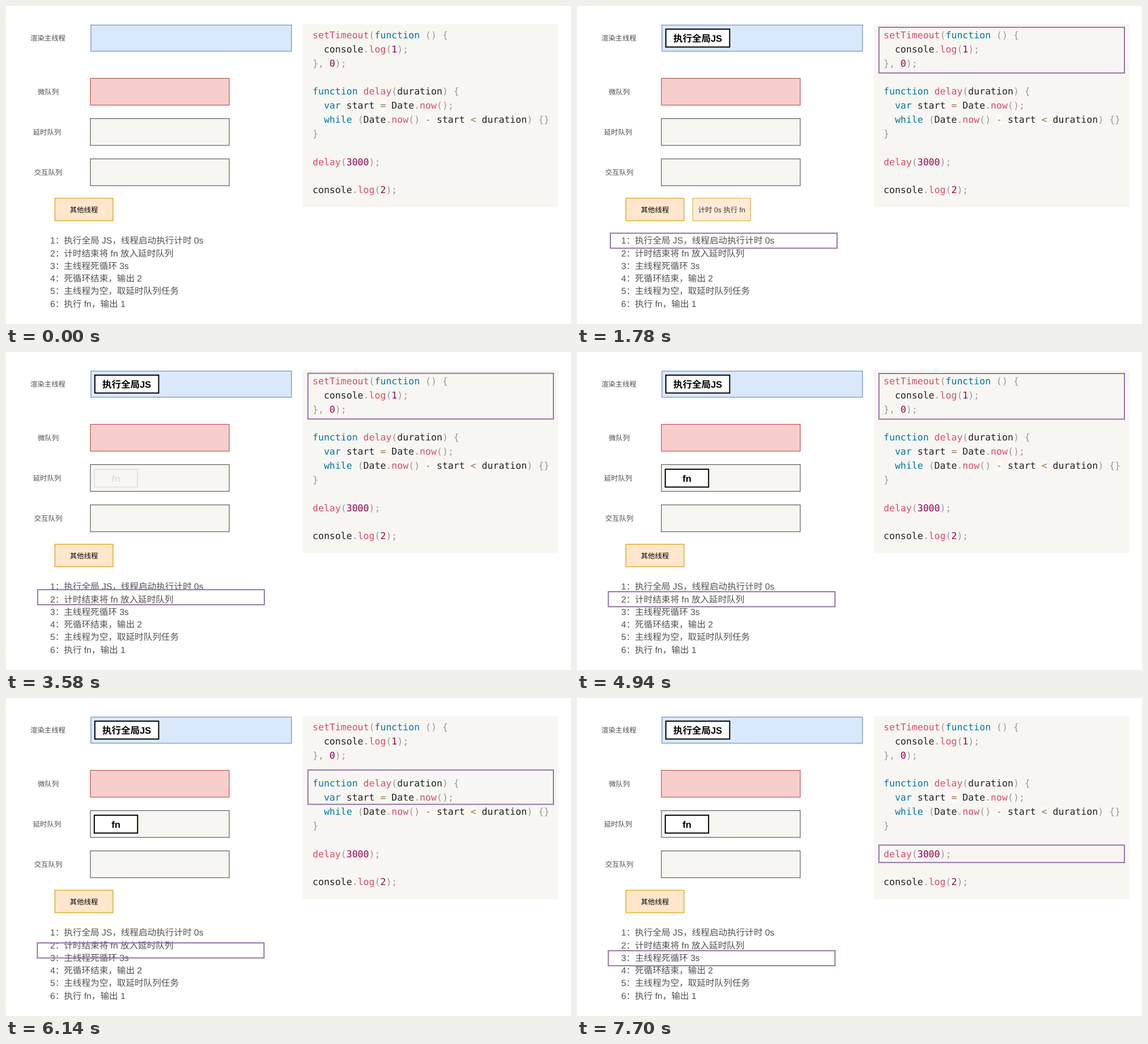
Recreate the animation shown at these times as an HTML page. Size 997 by 561 pixels, loop 8000 ms.

```html
<!DOCTYPE html>
<html lang="zh-CN">
<head>
<meta charset="utf-8">
<title>事件循环</title>
<style>
  html, body { margin: 0; width: 100%; height: 100%; overflow: hidden; background: #fff; }
  svg { display: block; width: 997px; height: 561px; }
  text { font-family: "Liberation Sans", "Noto Sans CJK SC", "Noto Sans CJK", sans-serif; font-size: 12.4px; white-space: pre; text-rendering: geometricPrecision; }
  .mid { text-anchor: middle; }
  .label { fill: #4c4c4c; }
  .list { font-size: 15.6px; fill: #505050; }
  .task { font-size: 16.5px; font-weight: bold; }
  .code { font-family: "DejaVu Sans Mono", monospace; font-size: 16.54px; fill: #222; }
  .frame { fill: none; stroke: #9673a6; stroke-width: 2; }
</style>
</head>
<body>
<svg id="stage" viewBox="0 0 997 561"></svg>
<script>
const LOOP = 8000;
const stage = document.getElementById('stage');

function add(parent, tag, attrs, content = '') {
  const node = document.createElementNS('http://www.w3.org/2000/svg', tag);
  for (const key in attrs) node.setAttribute(key, attrs[key]);
  node.textContent = content;
  return parent.appendChild(node);
}

const box = (parent, x, y, width, height, fill, stroke = 'none', strokeWidth = 1.2) =>
  add(parent, 'rect', { x, y, width, height, fill, stroke, 'stroke-width': strokeWidth });
const text = (parent, x, y, cls, content) => add(parent, 'text', { x, y, class: cls }, content);

// Queues and threads
const ORANGE = ['#ffe6cc', '#d79b00'];
const CREAM = '#f7f6f2';
box(stage, 149.8, 33.6, 354, 46.2, '#dae8fc', '#6c8ebf');
box(stage, 148.9, 127.6, 245, 47.3, '#f8cecc', '#b85450');
box(stage, 148.9, 198.6, 245, 47.3, CREAM, '#5c5c5c');
box(stage, 148.9, 269.7, 245, 47.3, CREAM, '#5c5c5c');
box(stage, 86.3, 339.2, 102.5, 39.6, ...ORANGE);
text(stage, 74, 61, 'mid label', '渲染主线程');
text(stage, 74.5, 156, 'mid label', '微队列');
text(stage, 72.5, 227, 'mid label', '延时队列');
text(stage, 74.5, 298, 'mid label', '交互队列');
text(stage, 137.5, 363.5, 'mid', '其他线程');

[
  '执行全局 JS，线程启动执行计时 0s',
  '计时结束将 fn 放入延时队列',
  '主线程死循环 3s',
  '死循环结束，输出 2',
  '主线程为空，取延时队列任务',
  '执行 fn，输出 1'
].forEach((line, i) => text(stage, 78, 419.3 + i * 22.25, 'list', `${i + 1}：${line}`));

// Code panel
const CODE = `setTimeout(function () {
  console.log(1);
}, 0);

function delay(duration) {
  var start = Date.now();
  while (Date.now() - start < duration) {}
}

delay(3000);

console.log(2);`;
const CHAR = 9.957, LINE = 24.86;

function tokenColor(token, rest) {
  if (/^(function|var|while)$/.test(token)) return '#07a';
  if (/^\d/.test(token)) return '#905';
  if (/^[=<-]$/.test(token)) return '#9a6e3a';
  if (/^\w/.test(token)) return rest[0] === '(' ? '#dd4a68' : '#222';
  return '#999';
}

box(stage, 523.5, 32, 451, 323, CREAM);
CODE.split('\n').forEach((line, row) => {
  const baseline = 57 + row * LINE;
  for (const match of line.matchAll(/[=<-]/g))
    box(stage, 541 + match.index * CHAR, baseline - 15.4, CHAR, 19.3, 'rgba(255,255,255,.5)');
  const codeLine = text(stage, 541, baseline, 'code', '');
  for (const match of line.matchAll(/\w+|\s+|[^\w\s]/g)) {
    const rest = line.slice(match.index + match[0].length);
    add(codeLine, 'tspan', { fill: tokenColor(match[0], rest) }, match[0]);
  }
});

// Animated parts
const intro = add(stage, 'g', {});
box(intro, 156.8, 40.8, 112.6, 31.6, '#fff', '#000', 2);
text(intro, 213, 62.7, 'mid task', '执行全局JS');

const timer = add(intro, 'g', {});
box(timer, 204.4, 339.2, 102, 39.6, ...ORANGE);
text(timer, 255.3, 363.5, 'mid', '计时 0s 执行 fn');

const callback = add(stage, 'g', {});
box(callback, 155.8, 206.8, 76.4, 31.5, '#fff', '#000', 2);
text(callback, 194, 228.5, 'mid task', 'fn');

const codeFrame = add(intro, 'rect', { class: 'frame', x: 532.8, width: 433.2 });
const listFrame = add(intro, 'rect', { class: 'frame', width: 400, height: 26.5 });

const clamp = v => Math.min(1, Math.max(0, v));
const mix = (a, b, k) => a + (b - a) * k;

// cubic-bezier(.42, 0, .58, 1)
function ease(p) {
  let low = 0, high = 1, s = 0.5;
  for (let i = 0; i < 24; i++) {
    s = (low + high) / 2;
    const x = 1.26 * s * (1 - s) ** 2 + 1.74 * s * s * (1 - s) + s ** 3;
    if (x < p) low = s; else high = s;
  }
  return s * s * (3 - 2 * s);
}

const linear = (t, start, end) => clamp((t - start) / (end - start));
const eased = (t, start, end) => {
  const p = linear(t, start, end);
  return p === 0 || p === 1 ? p : ease(p);
};

function setAttrs(node, attrs) {
  for (const key in attrs) node.setAttribute(key, attrs[key]);
}

function draw(t) {
  const toSecond = eased(t, 1475, 4375);
  const toThird = eased(t, 4860, 7750);
  setAttrs(intro, { opacity: linear(t, 480, 1020) });
  setAttrs(timer, { opacity: 1 - eased(t, 1460, 2440) });
  setAttrs(callback, { opacity: eased(t, 3380, 4375) });
  setAttrs(codeFrame, { y: mix(37.6, 259.6, toThird), height: mix(80.6, 30.7, toThird) });
  setAttrs(listFrame, { x: mix(59, 55.3, toSecond), y: 400.3 + 22.5 * toSecond + 23 * toThird });
}

function tick() {
  draw(performance.now() % LOOP);
  requestAnimationFrame(tick);
}
tick();
</script>
</body>
</html>
```
